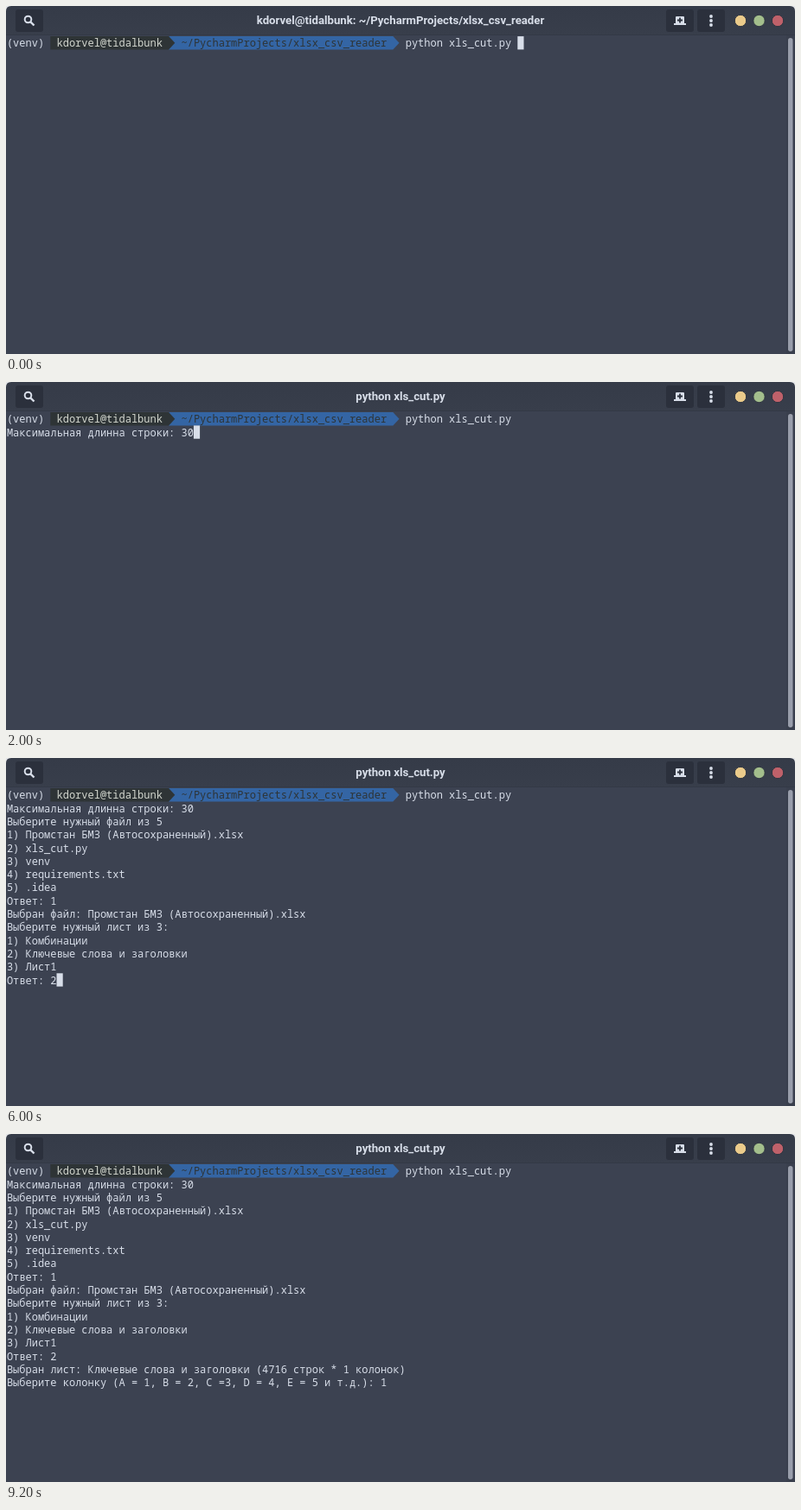
These frames come from a looping animation (912 by 403 pixels, 10000 ms). An HTML page:

```html
<!DOCTYPE html>
<html lang="ru">
<head>
<meta charset="utf-8">
<title>Terminal</title>
<style>
  html, body { margin: 0; width: 100%; height: 100%; overflow: hidden; background: #3c4251; }
  svg { display: block; }
  text { white-space: pre; }
  #title { font: bold 13.2px Roboto, "Noto Sans", sans-serif; fill: #d8dee9; text-anchor: middle; }
  #screen { font: 500 12px "Noto Sans Mono", "DejaVu Sans Mono", monospace; fill: #d8dee9; }
  .button { fill: #2b303c; }
  .icon { fill: #d8dee9; }
</style>
</head>
<body>
<svg width="912" height="403" viewBox="0 0 912 403">
  <defs>
    <linearGradient id="bar" x2="0" y2="1">
      <stop stop-color="#353b48"/><stop offset="1" stop-color="#383e4b"/>
    </linearGradient>
  </defs>
  <rect width="912" height="40" fill="#e4e6e9"/>
  <path d="M0 34V6Q0 0 6 0H906Q912 0 912 6V34Z" fill="url(#bar)"/>
  <rect y="33" width="912" height="1" fill="#333946"/>
  <rect y="34" width="912" height="369" fill="#3c4251"/>
  <rect x="902" y="34" width="10" height="369" fill="#393f4d"/>
  <rect x="904" y="37" width="5.5" height="363" rx="2.7" fill="#999eab"/>

  <g class="button">
    <rect x="11" y="4" width="32" height="26" rx="3"/>
    <rect x="763" y="4" width="32" height="26" rx="3"/>
    <rect x="799" y="4" width="32" height="26" rx="3"/>
  </g>
  <g fill="none" stroke="#d8dee9" stroke-width="2">
    <circle cx="25.5" cy="15.5" r="3.8"/>
    <path d="M28.3 18.3L32.5 22.5" stroke-width="2.4"/>
  </g>
  <path class="icon" d="M774 20V13Q774 12 775 12H783Q784 12 784 13V20H786V22H772V20Z"/>
  <path d="M779 13.5V19.5M776 16.5H782" stroke="#2b303c" stroke-width="1.8"/>
  <g class="icon">
    <circle cx="815" cy="12" r="1.9"/><circle cx="815" cy="17" r="1.9"/><circle cx="815" cy="22" r="1.9"/>
  </g>
  <g stroke="#2e3440" stroke-width="1">
    <circle cx="849" cy="17" r="6.7" fill="#ebcb8b"/>
    <circle cx="870.5" cy="17" r="6.7" fill="#a3be8c"/>
    <circle cx="892" cy="17" r="6.7" fill="#bf616a"/>
  </g>
  <text id="title" x="456" y="21.3"></text>
  <g id="screen"></g>
</svg>
<script>
const CELL = 7.2, ROW = 15.3, LEFT = 0.9, TOP = 35.1;
const user = "kdorvel@tidalbunk", path = "~/PycharmProjects/xlsx_csv_reader", command = "python xls_cut.py";
const file = "Промстан БМЗ (Автосохраненный).xlsx", sheet = "Ключевые слова и заголовки";
const lines = [
  "Максимальная длинна строки: 30",
  "Выберите нужный файл из 5",
  "1) " + file,
  "2) xls_cut.py",
  "3) venv",
  "4) requirements.txt",
  "5) .idea",
  "Ответ: 1",
  "Выбран файл: " + file,
  "Выберите нужный лист из 3:",
  "1) Комбинации",
  "2) " + sheet,
  "3) Лист1",
  "Ответ: 2",
  `Выбран лист: ${sheet} (4716 строк * 1 колонок)`,
  "Выберите колонку (A = 1, B = 2, C =3, D = 4, E = 5 и т.д.): 1"
];
const shown = [0, 1, 8, 14, 16];   // output lines visible at each step
const STEP = 2000;

const title = document.getElementById("title"), screen = document.getElementById("screen");
const colX = col => LEFT + col * CELL;
const write = (col, row, s, fill = "#d8dee9") =>
  `<text x="${colX(col)}" y="${TOP + 12.2 + row * ROW}" fill="${fill}">${s}</text>`;

// Prompt segment whose last cell is an arrowhead
function segment(from, to, fill) {
  const tip = colX(to + 1);
  return `<path d="M${colX(from)} ${TOP}H${colX(to)}L${tip} ${TOP + ROW / 2}L${colX(to)} ${TOP + ROW}H${colX(from)}Z" fill="${fill}"/>`;
}

const prompt = segment(26, 62, "#3465a4") + segment(7, 26, "#2e3436") +
  write(0, 0, "(venv)") + write(8, 0, user, "#d3d7cf") +
  write(28, 0, path, "#2e3436") + write(64, 0, command);

function render(step) {
  const count = shown[step];
  title.textContent = step ? command : `${user}: ${path}`;
  let out = prompt + lines.slice(0, count).map((s, i) => write(0, i + 1, s)).join("");
  if (count < lines.length) {
    const col = count ? lines[count - 1].length : 82;
    out += `<rect x="${colX(col)}" y="${TOP + count * ROW}" width="${CELL}" height="${ROW}" fill="#d8dee9"/>`;
  }
  screen.innerHTML = out;
}

let current = -1;
function tick() {
  const step = Math.floor(performance.now() / STEP) % shown.length;
  if (step !== current) render(current = step);
  requestAnimationFrame(tick);
}
tick();
</script>
</body>
</html>
```
